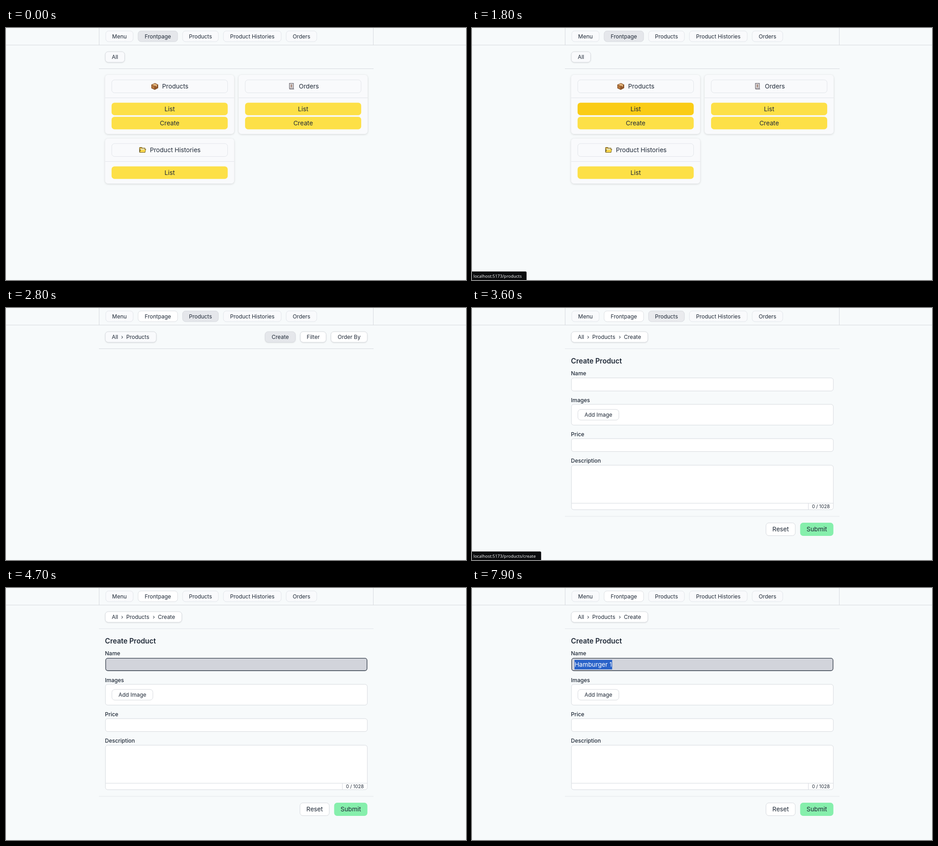
Write an HTML page that moves like this. It is 1010x554 px and loops after 8 s.

```html
<!DOCTYPE html>
<html lang="en">
<head>
<meta charset="utf-8">
<title>Create product demo</title>
<style>
  html, body { margin: 0; width: 100%; height: 100%; overflow: hidden; background: #f7fafb; }
  svg { display: block; width: 1010px; height: 554px; }
  text { font-family: Inter, sans-serif; fill: #1f2937; white-space: pre; }
  .status { font-family: "Open Sans", "Noto Sans", sans-serif; fill: #fff; }
  .raised { filter: drop-shadow(0 1px 1px rgba(0, 0, 0, .1)); }
  .card { filter: drop-shadow(0 1px 2px rgba(0, 0, 0, .15)); }
</style>
</head>
<body>
<svg id="stage" viewBox="0 0 1010 554"></svg>
<script>
const LOOP = 8000;
const SMALL = 11.97, BASE = 13.68, LARGE = 15.39, TINY = 10.26;
const PAGE = '#f7fafb', SURFACE = '#f9fafc', PRESSED = '#e5e7eb', LINE = '#d6d9de', PALE = '#e2e5ea';
const YELLOW = '#fde047', AMBER = '#facc15';
const stage = document.getElementById('stage');

function add(parent, tag, attrs, content) {
  const node = document.createElementNS('http://www.w3.org/2000/svg', tag);
  for (const key in attrs) node.setAttribute(key, attrs[key]);
  if (content !== undefined) node.textContent = content;
  parent.append(node);
  return node;
}

const group = (parent = stage, attrs = {}) => add(parent, 'g', attrs);

function box(parent, x, y, right, bottom, attrs) {
  return add(parent, 'rect', { x, y, width: right - x, height: bottom - y, rx: 6.5, ...attrs });
}

// Text is placed by the vertical centre of its capitals.
function label(parent, content, x, cy, size, attrs) {
  return add(parent, 'text', { x, y: cy + size * .364, 'font-size': size, ...attrs }, content);
}

function button(parent, content, x, y, right, bottom, attrs, size = SMALL) {
  const rect = box(parent, x, y, right, bottom, attrs);
  label(parent, content, (x + right) / 2, (y + bottom) / 2, size, { 'text-anchor': 'middle' });
  return rect;
}

const line = (parent, d, stroke) => add(parent, 'path', { d, stroke, fill: 'none' });
const shape = (parent, d, fill) => add(parent, 'path', { d, fill });

// Header
line(stage, 'M0 37.5H1010M204.5 0V37.5M806.5 0V37.5', LINE);
const navButton = (content, x, right) =>
  button(stage, content, x, 6.5, right, 30, { fill: SURFACE, stroke: PALE });
navButton('Menu', 219, 279.2);
const navFront = navButton('Frontpage', 290, 376.8);
const navProducts = navButton('Products', 387.7, 466.3);
navButton('Product Histories', 477.3, 604.3);
navButton('Orders', 615.2, 682.3);

// Breadcrumb
const crumb = box(stage, 218, 52, 260.5, 75.3, { stroke: LINE, class: 'raised' });
const rule = line(stage, 'M204 89.5H807', LINE);
label(stage, 'All', 232.2, 63.5, SMALL);
const crumbProducts = group(), crumbCreate = group();
label(crumbProducts, '›', 252.7, 63.5, SMALL);
label(crumbProducts, 'Products', 264, 63.5, SMALL);
label(crumbCreate, '›', 322.2, 63.5, SMALL);
label(crumbCreate, 'Create', 333.5, 63.5, SMALL);

// Frontpage cards
const home = group();

function parcelIcon(parent) {
  shape(parent, 'M0 3.5L8 0L15 3.5V11L7.5 15L0 11.5Z', '#7a4a25');
  shape(parent, 'M1 4L8 1L14 4L7.5 7Z', '#d9a066');
  shape(parent, 'M1 5L7 7.8V13.6L1 10.8Z', '#b8763c');
  shape(parent, 'M8 7.8L14 5V10.6L8 13.7Z', '#96592b');
  shape(parent, 'M4 2.7L5.8 2L12 4.9V7.4L10.3 8.2V5.6Z', '#efcf9b');
}

function receiptIcon(parent) {
  shape(parent, 'M1 0H11V12L12 14H2L1 12Z', '#6e6a70');
  shape(parent, 'M2.2 1.2H9.8V11.5H2.2Z', '#dcd9dc');
  shape(parent, 'M4.5 3H7.5V9.5H4.5Z', '#a88b7c');
  shape(parent, 'M2.5 12.2H10.5V13H3Z', '#c9c4c8');
}

function folderIcon(parent) {
  shape(parent, 'M0 2L1 1H5.5L7 2.5H13V5H15L13 13H1L0 12Z', '#6b5a1d');
  shape(parent, 'M1 2.2H5L6.5 3.6H12V6H1Z', '#e0a92e');
  shape(parent, 'M2.5 4.2H11.5V7H2.5Z', '#dfeadd');
  shape(parent, 'M3.5 6.2H14L12.2 12H1.3Z', '#f8d64e');
}

function card({ x, y, title, textX, icon, iconX, actions }) {
  const top = group(home, { transform: `translate(${x} ${y})` });
  box(top, 0, 0, 283.3, 68 + actions.length * 31, { fill: SURFACE, class: 'card' });
  box(top, 14.5, 11, 269, 39.5, { fill: SURFACE, stroke: PALE });
  line(top, 'M0 50.5H283.3', PALE);
  icon(group(top, { transform: `translate(${iconX} 18)` }));
  label(top, title, textX, 25.5, BASE);
  return actions.map((name, i) =>
    button(top, name, 14.2, 61.2 + i * 31, 269.2, 88.7 + i * 31, { fill: YELLOW }, BASE));
}

const [listButton] = card({ x: 217.6, y: 103, title: 'Products', textX: 125.2, icon: parcelIcon, iconX: 101.5, actions: ['List', 'Create'] });
card({ x: 510.7, y: 103, title: 'Orders', textX: 132.3, icon: receiptIcon, iconX: 110, actions: ['List', 'Create'] });
card({ x: 217.6, y: 243, title: 'Product Histories', textX: 98.3, icon: folderIcon, iconX: 75, actions: ['List'] });

// Product list toolbar
const toolbar = group();
const [toolCreate, toolFilter, toolOrder] = [['Create', 569, 635.3], ['Filter', 646.2, 702.8], ['Order By', 713.5, 793.2]]
  .map(([name, x, right]) => button(toolbar, name, x, 52, right, 75.3, { stroke: LINE, class: 'raised' }));

// Create form
const form = group();
label(form, 'Create Product', 217.3, 116, LARGE, { 'font-weight': 600 });
[['Name', 144], ['Images', 202.5], ['Price', 277.7], ['Description', 335.5]]
  .forEach(([name, y]) => label(form, name, 217.3, y, SMALL, { 'font-weight': 500 }));
const field = (y, bottom) => box(form, 218.3, y, 793.3, bottom, { rx: 5, fill: '#fff', stroke: LINE });
field(153.7, 182.4);
field(211.8, 257.4);
field(287.2, 315.6);
field(345.6, 443.4);
line(form, 'M218.5 429.2H793M738.5 429.2V443', LINE);
label(form, '0 / 1028', 766, 436.3, TINY, { 'text-anchor': 'middle' });
button(form, 'Add Image', 232.5, 223, 322.5, 246.4, { fill: '#fff', stroke: LINE });
line(form, 'M204 458H807', PALE);
button(form, 'Reset', 645.5, 472.4, 709.8, 500.5, { fill: '#fff', stroke: LINE }, BASE);
button(form, 'Submit', 720.5, 472, 793.5, 501, { fill: '#86efac' }, BASE);

const focus = box(form, 218.9, 154.5, 792.6, 181.6, { rx: 4.5, stroke: '#1f2937', 'stroke-width': 1.1 });
const selection = box(form, 225, 158, 308, 179, { rx: 0, fill: '#2a63c9' });
const typed = label(form, '', 225.2, 168.3, BASE);
const caret = box(form, 225, 160, 226, 177, { rx: 0, fill: '#1f2937' });

// Link address in the corner
const status = group();
const statusBox = add(status, 'path', { fill: '#0b0c0e' });
const statusText = label(status, '', 3, 545.2, 9.45, { class: 'status' });

// Latest value in a flat list of time, value pairs
function at(t, ...steps) {
  let value = steps[1];
  for (let i = 0; i < steps.length; i += 2) if (t >= steps[i]) value = steps[i + 1];
  return value;
}

const show = (node, visible) => node.setAttribute('display', visible ? 'inline' : 'none');
const paint = (node, fill) => node.setAttribute('fill', fill);
const TYPE_TIMES = [5300, 5400, 5500, 5800, 5900, 6100, 6300, 6400, 6500, 6600, 6700];

function render(t) {
  const view = at(t, 0, 'home', 1900, 'list', 3600, 'form');
  show(home, view === 'home');
  show(toolbar, view === 'list');
  show(form, view === 'form');
  show(crumbProducts, view !== 'home');
  show(crumbCreate, view === 'form');
  crumb.setAttribute('width', { home: 42.5, list: 112, form: 168 }[view]);
  paint(crumb, view === 'form' ? '#fff' : SURFACE);
  rule.setAttribute('stroke', view === 'form' ? PALE : LINE);

  paint(navFront, at(t, 0, PRESSED, 1900, '#f1f2f5', 2000, '#fff'));
  navFront.setAttribute('stroke', at(t, 0, LINE, 2000, '#dcdfe3'));
  paint(navProducts, at(t, 0, SURFACE, 1900, '#eff1f3', 2000, PRESSED, 3600, '#eaebee', 3700, SURFACE));
  navProducts.setAttribute('stroke', at(t, 0, PALE, 2000, LINE, 3700, PALE));

  paint(listButton, at(t, 0, YELLOW, 1300, '#fcd832', 1400, AMBER));
  paint(toolOrder, at(t, 0, '#fff', 2400, '#f3f4f6', 2600, '#fff'));
  paint(toolFilter, at(t, 0, '#fff', 2500, '#f3f4f6', 2800, '#fff'));
  paint(toolCreate, at(t, 0, '#fff', 2600, '#f3f4f6', 2800, PRESSED));

  const address = at(t, 0, 'localhost:5173/products', 2800, 'localhost:5173/products/create');
  const end = at(t, 0, 117.5, 2800, 149.5);
  statusText.textContent = address;
  statusBox.setAttribute('d', `M0 535.3H${end}q2.3 0 2.3 2.3V554H0Z`);
  status.setAttribute('opacity', at(t, 0, 0, 1600, .5, 1700, 1, 2300, .7, 2400, .3, 2500, 0,
    3000, .5, 3100, 1, 3900, .5, 4000, 0));

  const selected = t >= 7900;
  const count = TYPE_TIMES.filter(time => t >= time).length;
  typed.textContent = 'Hamburger 1'.slice(0, count);
  typed.style.fill = selected ? '#fff' : '';
  show(focus, t >= 4200);
  paint(focus, at(t, 0, '#f9f8fb', 4300, '#d2d4db'));
  show(selection, selected);
  show(caret, at(t, 0, false, 4200, true, 4700, false, 5200, true, 7200, false, 7700, true, 7900, false));
  if (view === 'form') {
    const width = count ? typed.getComputedTextLength() : 0;
    caret.setAttribute('x', Math.round(225 + width));
    if (selected) selection.setAttribute('width', width + .6);
  }
}

const start = performance.now();
function tick() {
  render((performance.now() - start) % LOOP);
  requestAnimationFrame(tick);
}
tick();
</script>
</body>
</html>
```
